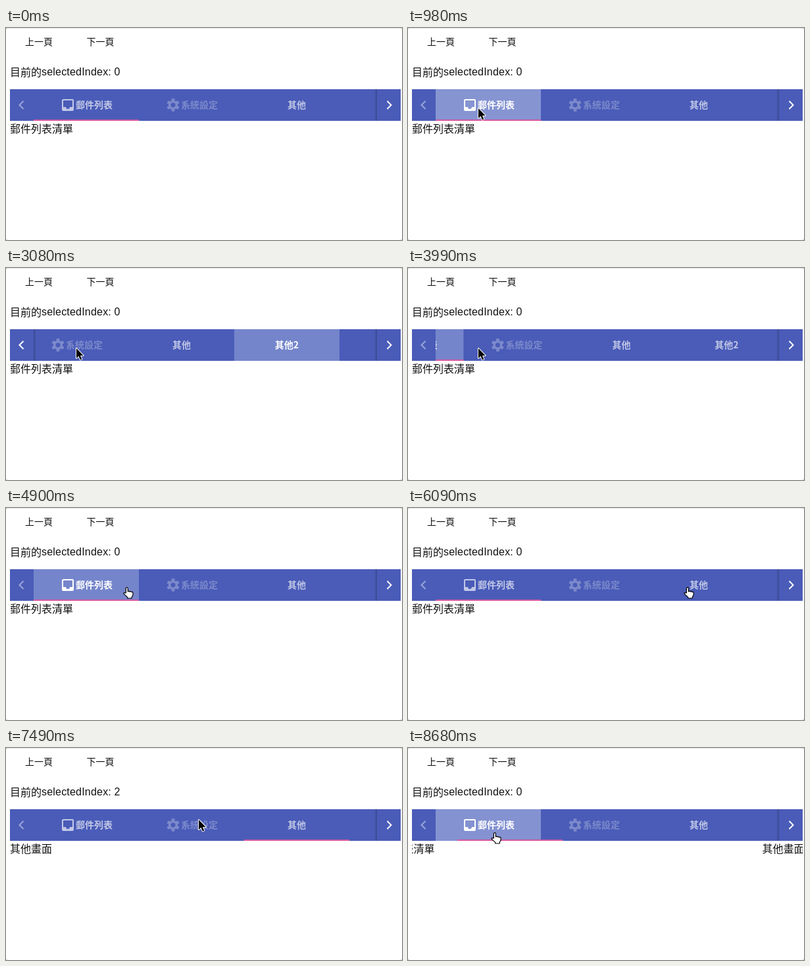
These frames come from a looping animation (602x322 px, 8750 ms). An HTML page with a canvas:

```html
<!DOCTYPE html>
<html lang="zh-Hant">
<head>
<meta charset="utf-8">
<title>Tabs</title>
<style>
html, body { margin: 0; width: 100%; height: 100%; overflow: hidden; background: #bbb; }
canvas { display: block; width: 602px; height: 322px; border-radius: 3px; }
</style>
</head>
<body>
<canvas id="stage" width="602" height="322"></canvas>
<script>
const ctx = document.getElementById('stage').getContext('2d');
const LOOP = 8750;
const BAR = { x: 6, y: 93, w: 594, h: 48 };
const VIEW = { x: 42, w: 522 };
const TAB_W = 160;
const CJK = '"Noto Sans CJK TC", "Noto Sans CJK JP", sans-serif';
const LATIN = '"Liberation Sans", sans-serif';

const TABS = [
  { label: '郵件列表', icon: drawInbox },
  { label: '系統設定', icon: drawGear, disabled: true },
  { label: '其他' },
  { label: '其他2' },
  { label: '其他3' },
];

// Time and index of the focused tab (-1 for none)
const FOCUS = [[0, -1], [700, 0], [2030, 2], [2660, 3], [3850, 0],
  [5180, -1], [6230, 2], [7350, -1], [8360, 0]];

// Time, x, y of the pointer tip
const POINTER = [[350, 576, 318], [420, 520, 290], [490, 400, 235], [560, 210, 155],
  [630, 107, 122], [4760, 107, 122], [4900, 183, 121], [5040, 305, 124], [5180, 305, 124],
  [5320, 314, 125], [5460, 300, 126], [5810, 300, 126], [6090, 425, 121], [6720, 425, 121],
  [6930, 340, 100], [7210, 275, 90], [7350, 275, 90], [7490, 293, 109], [7770, 293, 109],
  [8120, 150, 125], [8260, 132, 129], [LOOP, 132, 129]];

// Time, tab, x, y of each press
const PRESSES = [[700, 0, 107, 122], [6230, 2, 425, 121], [8360, 0, 132, 129]];

const INBOX = new Path2D('M19 3H5a2 2 0 0 0-2 2v14a2 2 0 0 0 2 2h14a2 2 0 0 0 2-2V5a2 2 0 0 0-2-2z' +
  'm0 12h-4a3 3 0 0 1-6 0H5V5h14z');
const ARROW = new Path2D('M0 0V15l3.5-3.2 2.4 5.6 2.4-1-2.4-5.5H10.6z');
const HAND = new Path2D('M-1.6 8V1.2a1.5 1.5 0 0 1 3 0V6l1.3-.8 1.5.9 1.4-.5 1.4 1 1.3-.2.8 1V11' +
  'l-1.8 3.2V16h-6.6v-1.6L-4.8 9.4q-.4-1.6.8-1.7z');

const clamp = v => Math.min(1, Math.max(0, v));

// cubic-bezier(.35, 0, .25, 1)
function ease(x) {
  if (x <= 0 || x >= 1) return clamp(x);
  let lo = 0, hi = 1;
  for (let i = 0; i < 20; i++) {
    const s = (lo + hi) / 2, r = 1 - s;
    if (1.05 * s * r * r + 0.75 * s * s * r + s * s * s < x) lo = s; else hi = s;
  }
  return lo * lo * (3 - 2 * lo);
}

const slide = (t, start) => ease((t - start) / 500);

function text(str, x, middle, size, weight = 400, family = CJK) {
  ctx.font = `${weight} ${size}px ${family}`;
  ctx.fillText(str, x, middle + size * 0.38);
}

function clipped(x, y, w, h, draw) {
  ctx.save();
  ctx.beginPath();
  ctx.rect(x, y, w, h);
  ctx.clip();
  draw();
  ctx.restore();
}

function drawInbox(x, y) {
  ctx.save();
  ctx.translate(x, y);
  ctx.fill(INBOX, 'evenodd');
  ctx.restore();
}

function drawGear(x, y) {
  const cx = x + 12, cy = y + 12;
  ctx.beginPath();
  for (let i = 0; i < 6; i++) {
    const corners = [[7, -0.36], [10, -0.23], [10, 0.23], [7, 0.36]];
    for (const [r, da] of corners) {
      const a = i * Math.PI / 3 + da;
      ctx.lineTo(cx + r * Math.sin(a), cy - r * Math.cos(a));
    }
  }
  ctx.closePath();
  ctx.moveTo(cx + 3.5, cy);
  ctx.arc(cx, cy, 3.5, 0, Math.PI * 2);
  ctx.fill('evenodd');
}

function drawChevron(x, dir, enabled) {
  ctx.strokeStyle = `rgba(255,255,255,${enabled ? 1 : 0.45})`;
  ctx.lineWidth = 2;
  ctx.beginPath();
  ctx.moveTo(x - 3 * dir, 111);
  ctx.lineTo(x + 3 * dir, 117);
  ctx.lineTo(x - 3 * dir, 123);
  ctx.stroke();
}

function drawEdgeShadow(edge, dir) {
  const g = ctx.createLinearGradient(edge, 0, edge + 4 * dir, 0);
  g.addColorStop(0, 'rgba(0,0,0,.22)');
  g.addColorStop(1, 'rgba(0,0,0,0)');
  ctx.fillStyle = g;
  ctx.fillRect(Math.min(edge, edge + 4 * dir), BAR.y, 4, BAR.h);
}

function drawTab(tab, i, left, focused) {
  if (focused) {
    ctx.fillStyle = '#7585cb';
    ctx.fillRect(left, BAR.y, TAB_W, BAR.h);
  }
  ctx.fillStyle = `rgba(255,255,255,${focused ? 1 : tab.disabled ? 0.28 : 0.66})`;
  ctx.font = `600 14px ${CJK}`;
  const iconW = tab.icon ? 24 : 0;
  const x = left + (TAB_W - iconW - ctx.measureText(tab.label).width) / 2;
  if (tab.icon) tab.icon(x, 105);
  text(tab.label, x + iconW, 117, 14, 600);
}

function drawRipples(t) {
  for (const [start, tab, x, y] of PRESSES) {
    const age = t - start;
    if (age < 0 || age > 550) continue;
    clipped(VIEW.x + tab * TAB_W, BAR.y, TAB_W, BAR.h, () => {
      ctx.fillStyle = `rgba(255,255,255,${0.14 * (1 - clamp((age - 250) / 300))})`;
      ctx.beginPath();
      ctx.arc(x, y, 160 * clamp(age / 225), 0, Math.PI * 2);
      ctx.fill();
    });
  }
}

function drawTabBar(t, page) {
  const scroll = 178 * (slide(t, 2660) - slide(t, 3850));
  const scrolled = t >= 2660 && t < 3850;
  const focus = FOCUS.filter(([start]) => start <= t).pop()[1];
  ctx.fillStyle = '#4a5cb8';
  ctx.fillRect(BAR.x, BAR.y, BAR.w, BAR.h);
  clipped(VIEW.x, BAR.y, VIEW.w, BAR.h, () => {
    TABS.forEach((tab, i) => drawTab(tab, i, VIEW.x + i * TAB_W - scroll, i === focus));
    drawRipples(t);
    ctx.fillStyle = '#d857a0';
    ctx.fillRect(VIEW.x + page * 2 * TAB_W - scroll, 139, TAB_W, 2);
  });
  if (scrolled) drawEdgeShadow(VIEW.x, 1);
  drawEdgeShadow(VIEW.x + VIEW.w, -1);
  drawChevron(23.5, -1, scrolled);
  drawChevron(582.5, 1, true);
}

function drawPointer(t) {
  const next = POINTER.findIndex(([time]) => time > t);
  if (next < 1) return;
  const [t0, x0, y0] = POINTER[next - 1], [t1, x1, y1] = POINTER[next];
  const k = (t - t0) / (t1 - t0);
  const x = x0 + (x1 - x0) * k, y = y0 + (y1 - y0) * k;
  const tab = TABS[Math.floor((x - VIEW.x) / TAB_W)];
  const hand = t > 4760 && y > BAR.y && tab && !tab.disabled;
  ctx.save();
  ctx.translate(x, y);
  ctx.lineJoin = 'round';
  ctx.lineWidth = hand ? 1.2 : 2;
  ctx.strokeStyle = hand ? '#000' : '#fff';
  ctx.fillStyle = hand ? '#fff' : '#000';
  const shape = hand ? HAND : ARROW;
  if (hand) ctx.fill(shape);
  ctx.stroke(shape);
  if (!hand) ctx.fill(shape);
  ctx.restore();
}

function draw(t) {
  const page = slide(t, 6230) - slide(t, 8360);
  const index = t >= 6230 && t < 8360 ? 2 : 0;
  ctx.fillStyle = '#fff';
  ctx.fillRect(0, 0, 602, 322);
  ctx.fillStyle = '#e6e6e6';
  ctx.fillRect(0, 0, 602, 1);

  ctx.fillStyle = '#111';
  text('上一頁', 29, 21, 14, 500);
  text('下一頁', 122.5, 21, 14, 500);
  text('目前的', 6, 66.5, 16);
  ctx.letterSpacing = '0.2px';
  text(`selectedIndex: ${index}`, 54, 66, 16, 400, LATIN);
  ctx.letterSpacing = '0px';

  drawTabBar(t, page);

  clipped(BAR.x, BAR.y + BAR.h, BAR.w, 30, () => {
    ctx.fillStyle = '#111';
    text('郵件列表清單', BAR.x - page * BAR.w, 152.5, 16);
    text('其他畫面', BAR.x + (1 - page) * BAR.w, 152.5, 16);
  });
  drawPointer(t);
}

const begin = performance.now();
function tick() {
  draw((performance.now() - begin) % LOOP);
  requestAnimationFrame(tick);
}
tick();
</script>
</body>
</html>
```
